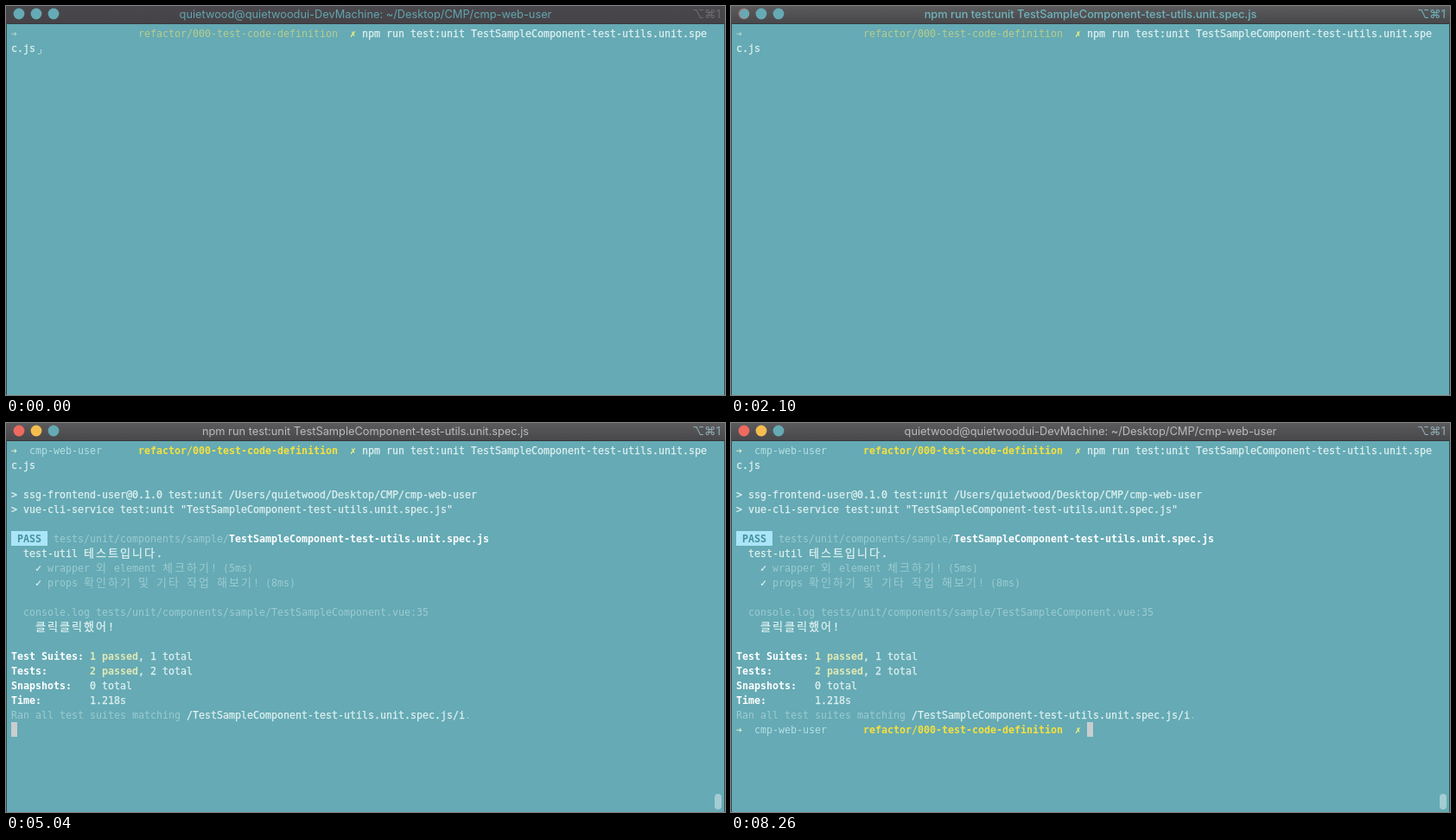
An HTML page with a canvas that plays this animation: 832x450 px, repeating every 8330 ms.

```html
<!DOCTYPE html>
<html lang="en">
<head>
<meta charset="utf-8">
<title>Unit test run</title>
<style>
html, body { margin: 0; width: 100%; height: 100%; overflow: hidden; background: #65aab4; }
canvas { display: block; }
</style>
</head>
<body>
<canvas id="stage" width="832" height="450"></canvas>
<script>
const ctx = document.getElementById('stage').getContext('2d');
const LOOP = 8330, LEFT = 6, TOP = 23, CELL = 7, ROW = 17;
// Moments at which the terminal changes, in ms
const ENTER = 1050, HEADER = 2380, RUNS = 3500, PASS = 4620, PROMPT = 5250;

const BG = '#65aab4', TEXT = '#e0f1f2', DIM = '#9ccbd1', WHITE = '#ffffff';
const YELLOW = '#f7e03c', GOOD = '#e0e8b6', CURSOR = '#c9cdd0';
const MONO = '"DejaVu Sans Mono", monospace';
const HANGUL = '"Noto Sans CJK KR", "Noto Sans CJK", sans-serif';
const SANS = 'Inter, "DejaVu Sans", sans-serif';

const SPEC = 'TestSampleComponent-test-utils.unit.spec.js';
const COMMAND = 'npm run test:unit ' + SPEC;
const FOLDER = 'tests/unit/components/sample/';
const HOME_TITLE = 'quietwood@quietwoodui-DevMachine: ~/Desktop/CMP/cmp-web-user';

function box(x, y, w, h, color) {
  ctx.fillStyle = color;
  ctx.fillRect(x, y, w, h);
}

function dot(x, y, r, color) {
  ctx.fillStyle = color;
  ctx.beginPath();
  ctx.arc(x, y, r, 0, Math.PI * 2);
  ctx.fill();
}

// Writes on the character grid; Hangul takes two cells.
function put(row, col, text, color = TEXT, bold = false) {
  const y = TOP + row * ROW + 13;
  let x = LEFT + col * CELL;
  ctx.textAlign = 'left';
  ctx.fillStyle = ctx.strokeStyle = color;
  ctx.lineWidth = 0.25;
  for (const ch of text) {
    const wide = /[\uac00-\ud7a3]/.test(ch);
    ctx.font = wide ? `13px ${HANGUL}` : `${bold ? 'bold ' : ''}11.63px ${MONO}`;
    ctx.fillText(ch, x, y);
    // Regular text is a little heavier than the plain face.
    if (color === TEXT) ctx.strokeText(ch, x, y);
    x += wide ? CELL * 2 : CELL;
  }
}

function cursor(row, col) {
  box(LEFT + col * CELL, TOP + row * ROW, CELL, ROW, CURSOR);
}

function prompt(row, faded) {
  put(row, 0, '➜', faded ? '#a9d3d2' : '#d3ebd0', !faded);
  if (!faded) put(row, 3, 'cmp-web-user', '#b4dfe5');
  put(row, 21, 'refactor/000-test-code-definition', faded ? '#b9cc8c' : YELLOW, !faded);
  put(row, 56, '✗', '#f5f47c', true);
}

function badge(row, label, back, color) {
  box(LEFT, TOP + row * ROW, 6 * CELL, ROW, back);
  put(row, 1, label, color, true);
  put(row, 7, FOLDER, DIM);
  put(row, 36, SPEC, WHITE, true);
}

function total(row, label, passed, rest) {
  put(row, 0, label, WHITE, true);
  put(row, 13, passed, GOOD, true);
  put(row, 13 + passed.length, rest);
}

function results() {
  badge(6, 'PASS', '#abe5f8', '#43909f');
  put(7, 2, 'test-util 테스트입니다.');
  put(8, 4, '✓');
  put(8, 6, 'wrapper 외 element 체크하기! (5ms)', DIM);
  put(9, 4, '✓');
  put(9, 6, 'props 확인하기 및 기타 작업 해보기! (8ms)', DIM);
  put(11, 2, 'console.log ' + FOLDER + 'TestSampleComponent.vue:35', DIM);
  put(12, 4, '클릭클릭했어!');
  total(14, 'Test Suites:', '1 passed', ', 1 total');
  total(15, 'Tests:', '2 passed', ', 2 total');
  total(16, 'Snapshots:', '', '0 total');
  total(17, 'Time:', '', '1.218s');
  put(18, 0, 'Ran all test suites matching ', DIM);
  put(18, 29, `/${SPEC}/i`);
  put(18, 75, '.', DIM);
}

function titleBar(t) {
  const idle = t < ENTER, vivid = t >= HEADER;
  const shade = ctx.createLinearGradient(0, 0, 0, 20);
  shade.addColorStop(0, idle ? '#4a474c' : '#5b5b5e');
  shade.addColorStop(1, idle ? '#454347' : '#48484b');
  box(0, 0, 832, 20, shade);
  box(0, 20, 832, 1, '#37393d');

  dot(15, 9, 6.4, vivid ? '#ee6a5f' : idle ? BG : '#b0706c');
  if (!vivid && !idle) dot(15.5, 9, 5.6, BG);
  if (t >= HEADER && t < PASS) dot(15, 9, 2, '#7c231d');
  dot(35, 9, 6.4, vivid ? '#f5bd4f' : BG);
  dot(55, 9, 6.4, BG);

  ctx.textAlign = 'center';
  ctx.font = `${idle || vivid ? 400 : 500} 12.8px ${SANS}`;
  ctx.fillStyle = vivid ? '#b9bbbd' : idle ? '#62a5af' : '#70b3be';
  ctx.fillText(idle || t >= PROMPT ? HOME_TITLE : COMMAND, 416, 14);
  ctx.textAlign = 'right';
  ctx.font = `13.5px ${SANS}`;
  ctx.fillStyle = vivid ? '#8fadb4' : idle ? '#6d6c70' : '#70b3be';
  ctx.fillText('⌥⌘1', 827, 14);
}

function draw(t) {
  box(0, 0, 832, 450, BG);
  titleBar(t);
  box(0, 20, 1, 430, '#2f4e55');
  box(831, 20, 1, 430, '#2f4e55');

  prompt(0, t < HEADER);
  put(0, 58, COMMAND.slice(0, 57));
  put(1, 0, COMMAND.slice(57));

  if (t < ENTER) {
    box(40, 50, 1, 5, '#b5d6da');
    box(37, 55, 3, 1, '#b5d6da');
  }
  if (t < HEADER) return;

  put(3, 0, '> ssg-frontend-user@0.1.0 test:unit /Users/quietwood/Desktop/CMP/cmp-web-user');
  put(4, 0, `> vue-cli-service test:unit "${SPEC}"`);
  ctx.fillStyle = '#a3cdd3';
  ctx.beginPath();
  ctx.roundRect(820, 429, 8, 18, 4);
  ctx.fill();

  if (t < RUNS) {
    cursor(6, 0);
  } else if (t < PASS) {
    badge(7, 'RUNS', '#cbca20', '#6c9c86');
    cursor(8, 0);
  } else {
    results();
    if (t >= PROMPT) prompt(19);
    cursor(19, t < PROMPT ? 0 : 58);
  }
}

const start = performance.now();
function tick() {
  draw((performance.now() - start) % LOOP);
  requestAnimationFrame(tick);
}
tick();
</script>
</body>
</html>
```
